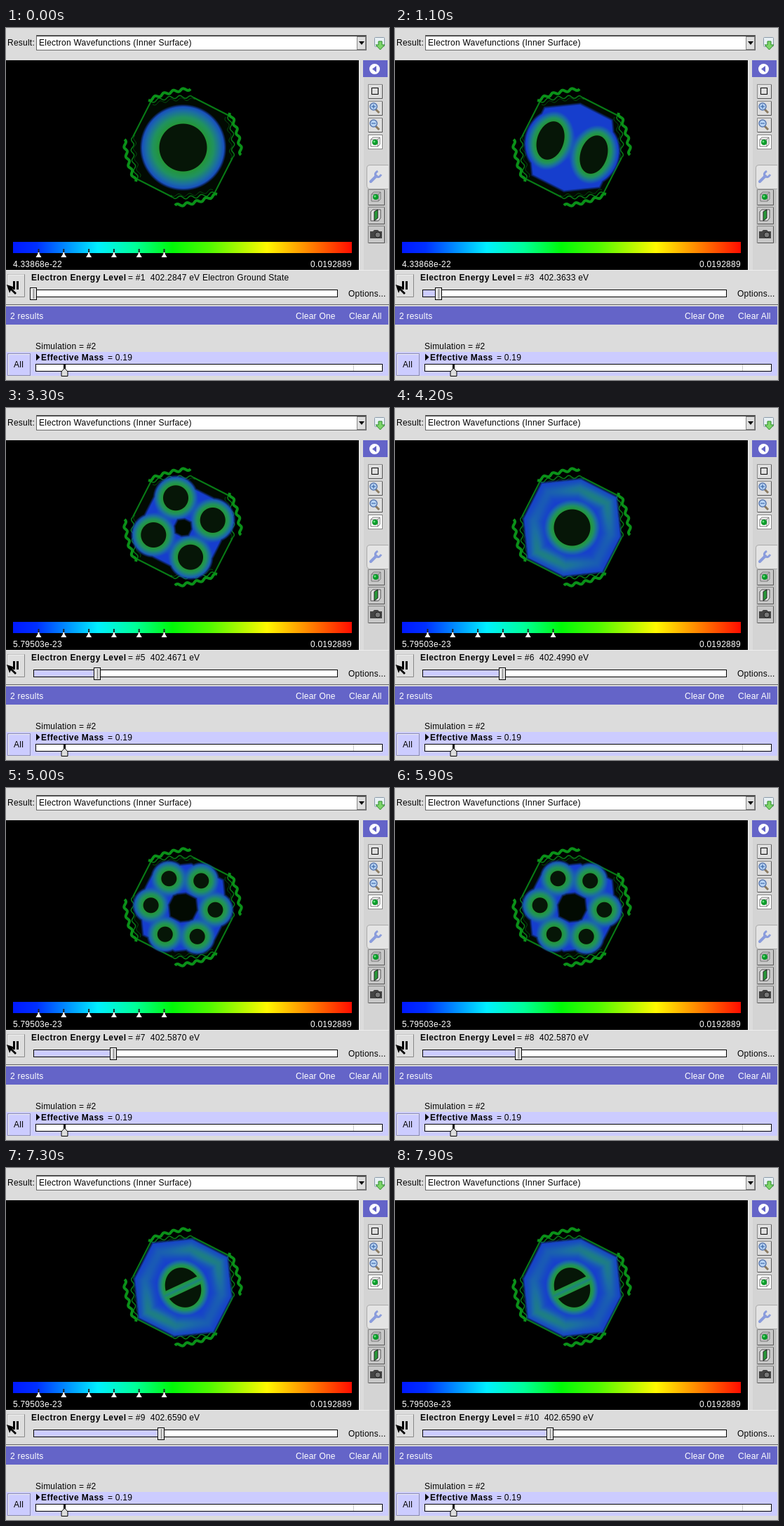
Write an HTML page with a canvas that moves like this. It is 546 px wide and 502 px high and loops after 8 s.

```html
<!DOCTYPE html>
<html lang="en">
<head>
<meta charset="utf-8">
<title>Electron Wavefunctions</title>
<style>
html, body { margin: 0; width: 100%; height: 100%; overflow: hidden; background: #dcdcdc; }
svg, canvas { position: absolute; left: 0; top: 0; display: block; }
canvas { left: 172px; top: 85px; }
text { font: 12px "Liberation Sans", Arial, sans-serif; letter-spacing: .23px; white-space: pre; }
.b { font-weight: bold; letter-spacing: .45px; }
.w { fill: #fff; }
.lav { fill: #ccccff; }
.bar { fill: #6464c8; }
.btn { fill: #dedede; stroke: #888; }
.shadow { fill: none; stroke: #555; }
.line { fill: none; stroke: #000; }
.wire { fill: none; stroke: #087c16; stroke-linejoin: round; }
</style>
</head>
<body>
<svg width="546" height="502" viewBox="0 0 546 502">
  <defs>
    <linearGradient id="ramp">
      <stop offset="0" stop-color="#0018ff"/>
      <stop offset=".07" stop-color="#0030ff"/>
      <stop offset=".25" stop-color="#00f0ff"/>
      <stop offset=".36" stop-color="#00ff9a"/>
      <stop offset=".47" stop-color="#00f808"/>
      <stop offset=".58" stop-color="#50f800"/>
      <stop offset=".75" stop-color="#fff800"/>
      <stop offset=".87" stop-color="#ff8800"/>
      <stop offset="1" stop-color="#ff0c00"/>
    </linearGradient>
    <g id="cube">
      <path d="M-6-4L-3-7H7V3L4 6H-6Z M-6-4H4V6 M4-4L7-7" fill="none" stroke="#777"/>
      <circle r="4" fill="#0a9a2a"/><circle cx="-1" cy="-1" r="1.5" fill="#6be080"/>
    </g>
    <g id="lens">
      <path d="M2 3L7 8" stroke="#8a7a60" stroke-width="3"/>
      <circle cx="-1" cy="-1" r="5" fill="#b8d4f4" stroke="#5878b0" stroke-width="1.5"/>
    </g>
  </defs>

  <rect width="546" height="502" fill="#dcdcdc"/>

  <!-- result chooser -->
  <text x="2" y="25">Result:</text>
  <rect x="43.5" y="10.5" width="470" height="21" fill="#fff" stroke="#666"/>
  <path d="M44 11.5H513" stroke="#333"/>
  <text x="47" y="25">Electron Wavefunctions (Inner Surface)</text>
  <rect x="500.5" y="12.5" width="12" height="18" class="btn"/>
  <path d="M503 19H511L507 24Z"/>
  <rect x="525.5" y="13.5" width="14" height="13" rx="1" fill="#e8f0f4" stroke="#8a9aaa"/>
  <path d="M531 19H536V24H540L533.500 31L527 24H531Z" fill="#7cd468" stroke="#2c8a2c"/>

  <!-- 3D view -->
  <rect y="46" width="503" height="299"/>
  <g id="wires" transform="translate(252 170)"></g>
  <rect x="10" y="305" width="483" height="16" fill="url(#ramp)"/>
  <g id="ticks"></g>
  <text id="low" x="10" y="341" class="w"></text>
  <text x="434" y="341" class="w">0.0192889</text>

  <!-- tool strip -->
  <path d="M503.5 46V345" stroke="#f4f4f4"/>
  <rect x="509" y="46" width="35" height="24" class="bar"/>
  <circle cx="525.5" cy="58.500" r="7.500" class="w"/>
  <path d="M528 54V63L522 58.500Z" class="bar"/>
  <path d="M510 70H544V345H510Z" fill="#d4d4d4"/>
  <path d="M515 196H544V307H515Z" fill="#c4c4c4"/>
  <g class="btn">
    <path d="M516.5 80.500H536.500V100.500H516.500Z M516.500 104.500H536.500V124.500H516.500Z M516.500 128.500H536.500V148.500H516.500Z"/>
    <path d="M516.500 230.500H539.500V252.500H516.500Z M516.500 255.500H539.500V279.500H516.500Z M516.500 282.500H539.500V306.500H516.500Z" fill="#c8c8c8"/>
  </g>
  <path class="shadow" d="M517 100.500H536.500V81M517 124.500H536.500V105M517 148.500H536.500V129M517 252.500H539.500V231M517 279.500H539.500V256M517 306.500H539.500V283"/>
  <rect x="521.5" y="85.500" width="9" height="9" class="line"/>
  <use href="#lens" x="525" y="113"/>
  <path d="M521 112H527M524 109V115" stroke="#2858a0"/>
  <use href="#lens" x="525" y="137"/>
  <path d="M521 136H527" stroke="#2858a0"/>
  <rect x="516.5" y="152.500" width="20" height="20" fill="#fff" stroke="#888"/>
  <use href="#cube" x="526" y="163"/>
  <path d="M545 195.500H519Q514.500 195.500 514.500 200V224Q514.500 229.500 519 229.500H545" fill="#e4e4e4" stroke="#aaa"/>
  <path d="M520 219L528 211" stroke="#8a9cdc" stroke-width="4" stroke-linecap="round"/>
  <path d="M530 204Q525 207 527 211Q531 215 535 209" fill="none" stroke="#8a9cdc" stroke-width="3"/>
  <use href="#cube" x="527" y="241"/>
  <path d="M520 262L523 259H534V271L531 275H520Z" fill="#ddd" stroke="#555"/>
  <path d="M525 262L530 259V271L525 275Z" fill="#2a9a3a" stroke="#222"/>
  <path d="M519 290H523L525 288H530L532 290H536V300H519Z" fill="#444"/>
  <circle cx="530" cy="295" r="4" fill="#777" stroke="#222"/>

  <!-- energy level -->
  <path d="M0 345.500H546" stroke="#eee"/>
  <path d="M2.500 351.500H26.500V383.500H2.500Z" class="btn"/>
  <path d="M3 383V352H26" fill="none" stroke="#fff"/>
  <path d="M10 361H13V373H10ZM15 361H18V373H15Z"/>
  <path d="M1 366L13 370L9 372L15 378L13 380L7 374L5 378Z"/>
  <text x="36" y="360" class="b">Electron Energy Level</text>
  <text id="energy" x="174" y="360"></text>
  <rect x="39.500" y="373.500" width="433" height="10" fill="#fff" stroke="#000"/>
  <rect id="fill" x="40" y="374" height="9" class="lav"/>
  <g id="thumb">
    <rect x="-4.500" y="370.500" width="9" height="17" fill="#dcdcdc" stroke="#000"/>
    <path d="M-3.500 386V371.500H3" fill="none" stroke="#fff"/>
    <path d="M.5 372V386" stroke="#777"/>
  </g>
  <text x="488" y="383">Options...</text>

  <!-- results -->
  <path d="M0 394.500H546" stroke="#666"/>
  <rect y="397" width="545" height="26" class="bar"/>
  <g class="w">
    <text x="6" y="415">2 results</text>
    <text x="413" y="415">Clear One</text>
    <text x="489" y="415">Clear All</text>
  </g>
  <text x="42" y="458">Simulation = #2</text>
  <rect y="462" width="545" height="34" class="lav"/>
  <rect x="2.500" y="464.500" width="32" height="31" class="lav" style="stroke:#8888b0"/>
  <path d="M3.500 495V465.500H34" fill="none" stroke="#f4f4ff"/>
  <text x="11" y="484">All</text>
  <path d="M43 464.500L48.500 469.500L43 474.500Z"/>
  <text x="50" y="474" class="b">Effective Mass</text>
  <text x="145" y="474">= 0.19</text>
  <rect x="42.500" y="479.500" width="494" height="10" fill="#fff" stroke="#000"/>
  <path d="M495.500 480V489" stroke="#ccc"/>
  <path d="M83.500 480V487" stroke="#000" stroke-width="3"/>
  <path d="M83.500 485L88 490V496.500H79V490Z" fill="#dcdcdc" stroke="#000"/>
</svg>
<canvas width="162" height="170"></canvas>

<script>
const $ = id => document.getElementById(id);
const RAD = Math.PI / 180;
const LOOP = 8000;

// Sine line from a to b, bowed away from the centre
function wave([x0, y0], [x1, y1], cycles, amp, bow = 3) {
  const dx = x1 - x0, dy = y1 - y0, len = Math.hypot(dx, dy);
  let d = '';
  for (let i = 0; i <= 60; i++) {
    const p = i / 60, s = amp * Math.sin(p * cycles * 2 * Math.PI) - 4 * bow * p * (1 - p);
    d += `${i ? 'L' : 'M'}${(x0 + dx * p - dy / len * s).toFixed(1)} ${(y0 + dy * p + dx / len * s).toFixed(1)}`;
  }
  return d;
}

const side = `<path class="wire" stroke-width="2" d="M-45-66L-71-15"/>
  <path class="wire" stroke-width="1.5" d="${wave([-45, -65], [15, -71], 4, 2)}"/>
  <path class="wire" stroke-width="1" opacity=".6" d="${wave([-43, -61], [17, -68], 4, 2)}"/>
  <path class="wire" stroke-width="4" style="stroke:#0a9018" d="${wave([-49, -67], [11, -83], 4.5, 1.8)}"/>`;
$('wires').innerHTML = '<path d="M-45-66L15-71L66-45L71 15L45 66L-15 71L-66 45L-71-15Z" fill="#020a02"/>' +
  [0, 90, 180, 270].map(a => `<g transform="rotate(${a})">${side}</g>`).join('');

for (let i = 0; i < 6; i++) {
  const x = 46.5 + 35.8 * i;
  $('ticks').innerHTML += `<path d="M${x} 315V322" stroke="#222" stroke-width="2"/>
    <path d="M${x - 1} 320H${x + 1}V322L${x + 4} 327H${x - 4}L${x - 1} 322Z" fill="#fff"/>`;
}

// Dark holes evenly spaced on a circle: rx points outward, ry along the circle,
// band is half the width of a strip that splits the hole
const holes = (count, dist, turn, rx, ry = rx, band = -99) => Array.from({ length: count }, (_, i) => {
  const a = turn * RAD + i * 2 * Math.PI / count;
  return { cos: Math.cos(a), sin: Math.sin(a), dist, rx, ry, band };
});

// rim: width around holes, fade: green to blue distance, core to disc: filled zone
const levels = [
  { eV: '402.2847', holes: holes(1, 0, 0, 34), rim: 28, fade: 28 },
  { eV: '402.3632', holes: holes(2, 32.5, 18, 19, 28), rim: 19, fade: 15, disc: 63 },
  { eV: '402.3633', holes: holes(2, 32.7, 108, 18, 28), rim: 20, fade: 15, disc: 59 },
  { eV: '402.4630', holes: holes(4, 43.5, 31, 18), rim: 15, fade: 14, core: 10, disc: 59 },
  { eV: '402.4671', holes: holes(4, 43.5, -14, 18), rim: 15, fade: 14, core: 10, disc: 59 },
  { eV: '402.4990', holes: holes(1, 0, 0, 26), rim: 14, fade: 14, disc: 70, ring: 1 },
  { eV: '402.5870', holes: holes(6, 46, 4, 11), rim: 16, fade: 15, core: 18, disc: 63 },
  { eV: '402.5870', holes: holes(6, 46, -26, 11), rim: 16, fade: 15, core: 18, disc: 63 },
  { eV: '402.6590', holes: holes(1, 0, 65, 29, 25, 6), rim: 14, fade: 12, disc: 70, ring: 1 },
  { eV: '402.6590', holes: holes(1, 0, 155, 29, 25, 6), rim: 14, fade: 12, disc: 70, ring: 1 }
];

const shades = [[36, 150, 55], [32, 146, 95], [27, 108, 165], [22, 62, 205]];
function shade(v) {
  const p = Math.min(Math.max(v, 0), 1) * 3, i = Math.min(Math.floor(p), 2);
  return shades[i].map((c, k) => c + (shades[i + 1][k] - c) * (p - i));
}

function holeDistance(h, x, y) {
  const u = x * h.cos + y * h.sin - h.dist, w = y * h.cos - x * h.sin;
  const rho = Math.hypot(u / h.rx, w / h.ry);
  const d = rho ? (rho - 1) * Math.hypot(u, w) / rho : -h.rx;
  return Math.max(d, h.band - Math.abs(u));
}

// Radius measured by the eight-sided shell
const normals = [27, 84].map(a => [Math.cos(a * RAD), Math.sin(a * RAD)]);
const shellRadius = (x, y) => Math.max(...normals.map(([c, s]) =>
  Math.max(Math.abs(x * c + y * s), Math.abs(y * c - x * s))));

const canvas = document.querySelector('canvas');
const ctx = canvas.getContext('2d');
function drawLevel({ holes, rim, fade, core = -9, disc = 0, ring }) {
  const { width, height } = canvas;
  const img = ctx.createImageData(width, height);
  const dark = [6, 22, 7];
  for (let py = 0; py < height; py++) for (let px = 0; px < width; px++) {
    const x = px - 80, y = py - 85, r = shellRadius(x, y);
    const sum = holes.reduce((s, h) => s + Math.exp(-holeDistance(h, x, y) / 2.5), 0);
    const d = -2.5 * Math.log(sum);
    const inside = Math.max(rim - d, Math.min(disc - r, r - core));
    if (inside <= 0) continue;
    let v = Math.min(d / fade, 1);
    if (ring) {
      const glow = 0.35 + 0.15 * Math.cos(2 * (Math.atan2(y, x) + 0.9));
      v *= 1 - glow * Math.exp(-(((r - 53) / 10) ** 2));
    }
    const solid = Math.min(Math.max(d + 0.5, 0), 1);
    const rgb = shade(v).map((c, k) => dark[k] + (c - dark[k]) * solid);
    img.data.set([...rgb, 255 * Math.min(inside / 4, 1)], (py * width + px) * 4);
  }
  ctx.putImageData(img, 0, 0);
}

// The label changes first, then the surface, then the slider
const starts = [100, 1000, 2000, 2900, 3900, 4800, 5800, 6800, 7600];
const ready = starts.map(s => s + 180);
ready[8] = LOOP;
const passed = (times, t) => times.filter(s => s <= t).length;

let state = '';
function frame(now) {
  const t = now % LOOP;
  const label = passed(starts, t), shown = passed(ready, t), slid = passed(ready, t - 120);
  const next = [label, shown, slid].join();
  if (next !== state) {
    state = next;
    $('energy').textContent = `= #${label + 1}  ${levels[label].eV} eV${label ? '' : ' Electron Ground State'}`;
    $('ticks').style.display = label > shown ? 'none' : '';
    $('low').textContent = shown < 3 ? '4.33868e-22' : '5.79503e-23';
    const x = Math.round(22.8 * slid);
    $('thumb').setAttribute('transform', `translate(${39 + x} 0)`);
    $('fill').setAttribute('width', x);
    drawLevel(levels[shown]);
  }
  requestAnimationFrame(frame);
}
frame(performance.now());
</script>
</body>
</html>
```
